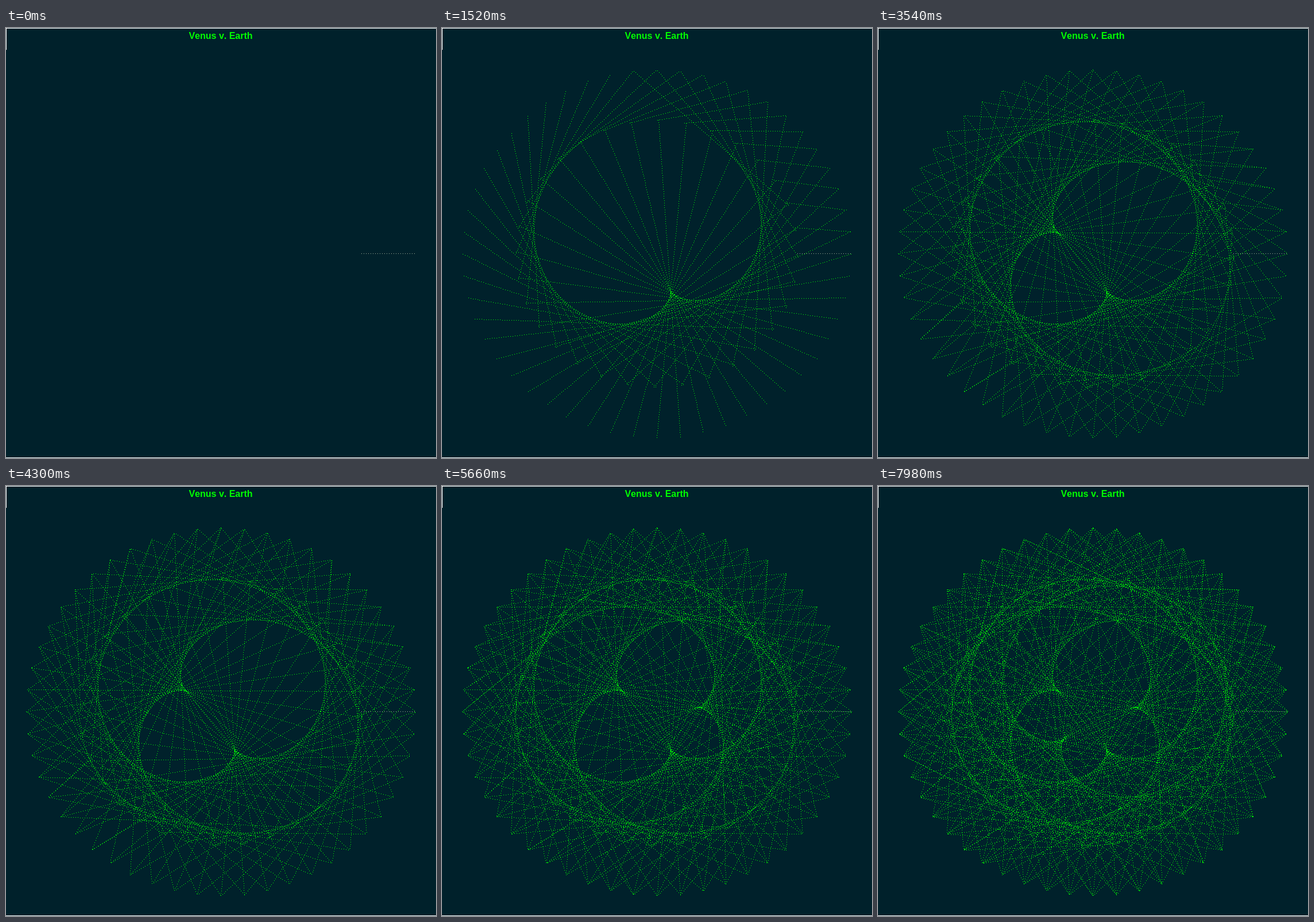
These frames come from a looping animation (749 px wide and 748 px high, 8 s). An HTML page with a canvas:

```html
<!DOCTYPE html>
<html lang="en">
<head>
<meta charset="utf-8">
<title>Venus v. Earth</title>
<style>
  html, body { margin: 0; width: 100%; height: 100%; overflow: hidden; background: #00212b; }
  canvas { display: block; }
</style>
</head>
<body>
<canvas id="stage" width="749" height="748"></canvas>
<script>
const ctx = document.getElementById('stage').getContext('2d');

const LOOP = 8000, TICK = 20, LINES_PER_TICK = 0.8678;
const CENTER = { x: 374, y: 392.4 };
const RADIUS = { x: 339.5, y: 320.8 };
const EARTH_STEP = 2 * Math.PI / 52;          // one week
const VENUS_STEP = EARTH_STEP * 365 / 225;
const VENUS_ORBIT = 0.723;
const DOT_GAP = 4;

function orbitPoint(angle, scale) {
  return {
    x: Math.round(CENTER.x + RADIUS.x * scale * Math.cos(angle)),
    y: Math.round(CENTER.y - RADIUS.y * scale * Math.sin(angle)),
  };
}

function dottedLine(a, b) {
  const dx = b.x - a.x, dy = b.y - a.y;
  const length = Math.hypot(dx, dy);
  for (let d = 0; d <= length; d += DOT_GAP) {
    ctx.fillRect(Math.round(a.x + dx * d / length), Math.round(a.y + dy * d / length), 1, 1);
  }
}

function drawWeek(week) {
  ctx.fillStyle = week ? '#00ff00' : '#a4b8a0';
  dottedLine(orbitPoint(week * VENUS_STEP, VENUS_ORBIT), orbitPoint(week * EARTH_STEP, 1));
}

function drawBackground() {
  ctx.fillStyle = '#00212b';
  ctx.fillRect(0, 0, 749, 748);
  ctx.fillStyle = '#fff';
  ctx.fillRect(0, 0, 749, 1);
  ctx.fillRect(0, 747, 749, 1);
  ctx.fillRect(0, 0, 1, 38);
  ctx.fillStyle = '#00ff00';
  ctx.font = 'bold 16px "Liberation Sans", Arial, sans-serif';
  ctx.fontKerning = 'none';
  ctx.textAlign = 'center';
  ctx.fillText('Venus v. Earth', 374, 19);
}

let drawn = Infinity;   // number of weeks already on the canvas

function render(now) {
  const tick = Math.floor((now % LOOP) / TICK);
  const count = Math.floor(tick * LINES_PER_TICK + 0.5) + 1;
  if (count < drawn) {
    drawBackground();
    drawn = 0;
  }
  while (drawn < count) drawWeek(drawn++);
}

const start = performance.now();
function frame() {
  render(performance.now() - start);
  requestAnimationFrame(frame);
}
frame();
</script>
</body>
</html>
```
